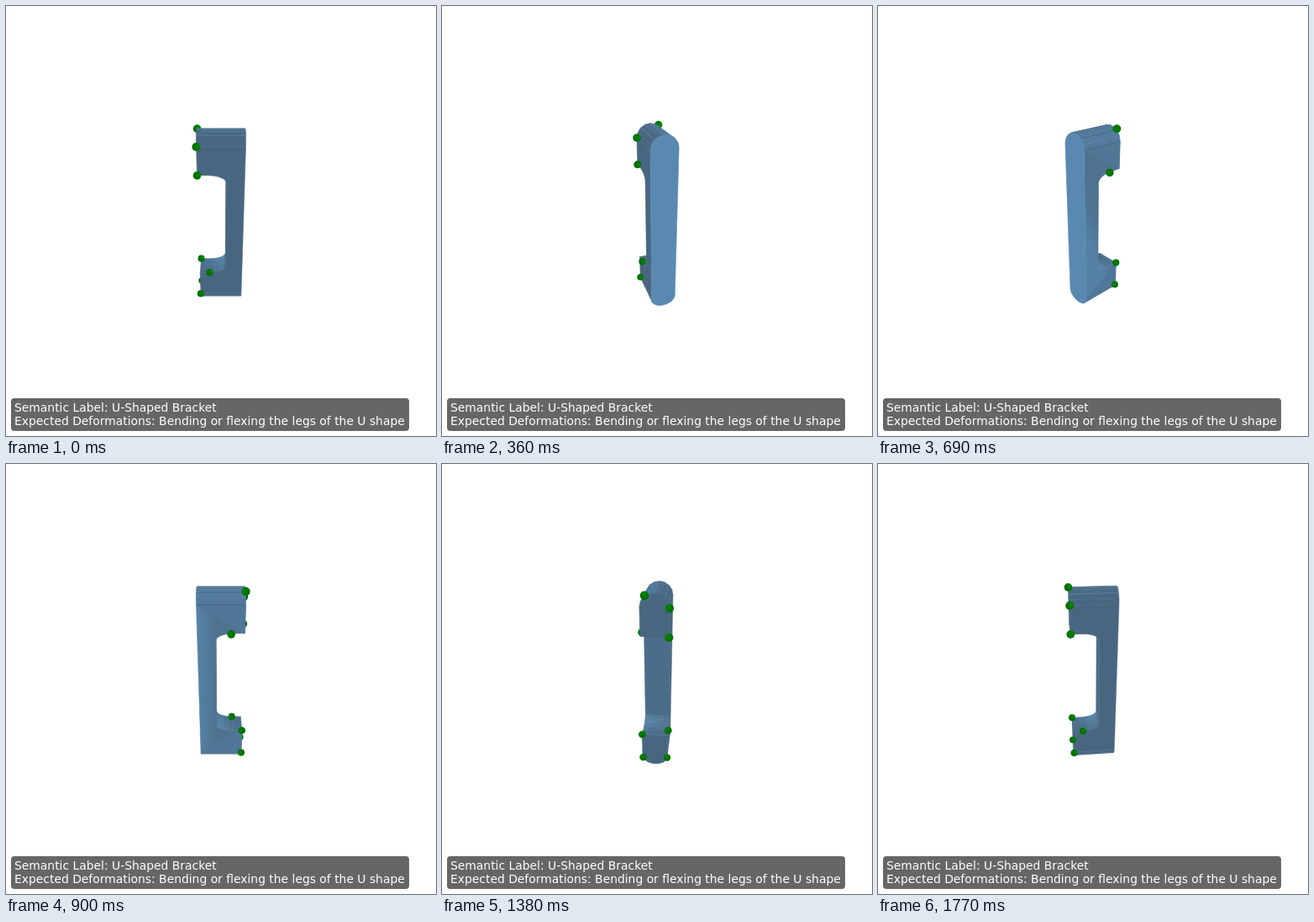
These frames come from a looping animation (512 by 512 pixels, 1.8 s). An HTML page with a canvas:

```html
<!DOCTYPE html>
<html lang="en">
<head>
<meta charset="utf-8">
<title>U-Shaped Bracket</title>
<style>
  html, body { margin: 0; width: 100%; height: 100%; overflow: hidden; background: #fff; }
  canvas, svg { position: absolute; left: 0; top: 0; }
  text { font: 13.89px "DejaVu Sans", sans-serif; fill: #fff; }
</style>
</head>
<body>
<canvas id="view" width="512" height="512"></canvas>
<svg width="512" height="512">
  <rect x="6" y="467" width="474" height="39" rx="4" fill="#666"/>
  <text x="10" y="483">Semantic Label: U-Shaped Bracket</text>
  <text x="10" y="499">Expected Deformations: Bending or flexing the legs of the U shape</text>
</svg>
<script>
const ctx = document.getElementById('view').getContext('2d');
const DIST = 448, SIN_E = 0.467, COS_E = 0.884;   // camera distance and elevation
const LIGHT = [0.8, 0.3, -0.5];

// Bracket: x = leg direction (spine at +x), y = up, z = thickness
const D = 25.7, W = 15.4, TOP = 95, BOTTOM = -95.5, LEG = 63.5;
const SPINE = 5.7, FILLET_X = -14, FILLET_Y = 55, STEPS = 8;

let cos, sin, camera;

function view([x, y, z]) {
  const Z = x * sin + z * cos;
  return [x * cos - z * sin, y * COS_E - Z * SIN_E, y * SIN_E + Z * COS_E];
}

function project(p) {
  const [x, y, z] = view(p), m = 1 / (1 - z / DIST);
  return [256 + x * m, 256 - y * m, m];
}

const facing = (n, p) => n.reduce((sum, v, i) => sum + v * (camera[i] - p[i]), 0) > 0;

function shade(k) {
  const mix = (a, b) => Math.round(a + (b - a) * k);
  return `rgb(${mix(72, 90)},${mix(101, 140)},${mix(126, 181)})`;
}

// ramp = [from point, to point, end tone] blends the tone across the face
function face(normal, points, tone, ramp) {
  if (!facing(normal, points[0])) return;
  let paint = shade(tone);
  if (ramp) {
    const [a, b] = [project(ramp[0]), project(ramp[1])];
    paint = ctx.createLinearGradient(a[0], a[1], b[0], b[1]);
    paint.addColorStop(0, shade(tone));
    paint.addColorStop(1, shade(ramp[2]));
  }
  ctx.beginPath();
  for (const p of points) ctx.lineTo(...project(p).slice(0, 2));
  ctx.closePath();
  ctx.fillStyle = ctx.strokeStyle = paint;
  ctx.lineWidth = 0.5;
  ctx.fill();
  ctx.stroke();
}

function line(a, b, tone) {
  ctx.beginPath();
  for (const p of [a, b]) ctx.lineTo(...project(p).slice(0, 2));
  ctx.strokeStyle = shade(tone);
  ctx.lineWidth = 1;
  ctx.stroke();
}

// Rounded end: side 1 is the top, -1 the bottom; angle runs from +z to -z
function cap(side, x, angle) {
  const [base, r] = side > 0 ? [TOP, 15] : [BOTTOM, 12];
  return [x, base + side * r * Math.sin(angle), W * Math.cos(angle)];
}

const arc = (n, f) => Array.from({ length: n + 1 }, (_, i) => f(i / n));
const capArc = (side, x) => arc(16, u => cap(side, x, u * Math.PI));

function fillet(side, z, u) {
  const t = u * Math.PI / 2;
  return [FILLET_X + (SPINE - FILLET_X) * Math.cos(t), side * (FILLET_Y + (LEG - FILLET_Y) * Math.sin(t)), z];
}

function drawInside() {
  face([-1, 0, 0], [[SPINE, FILLET_Y, W], [SPINE, FILLET_Y, -W], [SPINE, -FILLET_Y, -W], [SPINE, -FILLET_Y, W]], 0.2);
  for (const side of [1, -1]) {
    for (let i = 0; i < STEPS; i++) {
      const u = i / STEPS, v = (i + 1) / STEPS, t = (u + v) * Math.PI / 4;
      const a = fillet(side, -W, u), b = fillet(side, W, u);
      const normal = [-Math.cos(t) / (SPINE - FILLET_X), -side * Math.sin(t) / (LEG - FILLET_Y), 0];
      face(normal, [a, b, fillet(side, W, v), fillet(side, -W, v)],
        0.3 + 0.5 * Math.sin(2 * t), [a, b, 0.15 + 0.2 * Math.sin(2 * t)]);
    }
  }
  const a = [FILLET_X, -LEG, -W], b = [FILLET_X, -LEG, W];
  face([0, 1, 0], [a, b, [-D, -LEG, W], [-D, -LEG, -W]], 0.4, [a, b, 0.15]);
}

function sideOutline(z) {
  return [[D, TOP, z], [-D, TOP, z], [-D, LEG, z],
    ...arc(STEPS, u => fillet(1, z, 1 - u)), ...arc(STEPS, u => fillet(-1, z, u)),
    [-D, -LEG, z], [-D, BOTTOM, z], [D, BOTTOM, z]];
}

function drawOutside() {
  face([0, 0, 1], sideOutline(W), 0.03);
  face([0, 0, -1], sideOutline(-W), 0.72, [[D, 0, -W], [SPINE, 0, -W], 0.33]);
  for (const y of [1, -1]) {
    const outer = y > 0 ? TOP : BOTTOM;
    face([0, 0, -1], [[D, outer, -W], [-D, outer, -W], [-D, y * LEG, -W]], 0.46);
  }
  for (const side of [1, -1]) {
    for (let i = 0; i < STEPS; i++) {
      const a = i / STEPS * Math.PI, b = (i + 1) / STEPS * Math.PI, mid = (a + b) / 2;
      const normal = [0, side * Math.sin(mid), Math.cos(mid)];
      const tone = Math.max(0.05, 0.1 + 0.3 * side * Math.sin(mid) - 0.4 * Math.cos(mid));
      face(normal, [cap(side, -D, a), cap(side, D, a), cap(side, D, b), cap(side, -D, b)], tone);
    }
  }
  for (const [angle, tone] of [[0.8, 0.6], [1.25, 0.05], [2.3, 0.1], [Math.PI, 0]]) {
    const a = cap(1, -D, angle), b = cap(1, D, angle);
    if (facing([0, Math.sin(angle), Math.cos(angle)], a)) line(a, b, tone);
  }
  face([1, 0, 0], [...capArc(1, D), ...capArc(-1, D).reverse()], 0.93);
  face([-1, 0, 0], [...capArc(1, -D), [-D, LEG, -W], [-D, LEG, W]], 0.03);
  face([-1, 0, 0], [...capArc(-1, -D), [-D, -LEG, -W], [-D, -LEG, W]], 0.03);
}

const END = [-1, 0, 0], FRONT = [0, 0, 1], BACK = [0, 0, -1], UP = [0, 1, 0];
const balls = [
  { at: [-D, 107.5, -10], on: [END, [0, 0.76, -0.65]] },
  { at: [-D, TOP, W], on: [END, FRONT] },
  { at: [-D, LEG, W], on: [END, FRONT] },
  { at: [-11, 62.5, -W], on: [BACK] },
  { at: [FILLET_X, -LEG, W], on: [FRONT], inside: true },
  { at: [-D, -LEG, -W], on: [END, BACK], inside: true },
  { at: [-D, -98.5, -14.8], on: [END, BACK] },
  { at: [-D, -96.5, W], on: [END, FRONT] }
];

// 0 = behind the bracket, 1 = between inner and outer faces, 2 = in front
function layer({ at, on, inside }) {
  if (on.some(n => facing(n, at))) return 2;
  return inside && facing(UP, at) ? 1 : 0;
}

function drawBalls(level) {
  const [lx, ly] = view(LIGHT);
  for (const ball of balls) {
    if (layer(ball) !== level) continue;
    const [x, y, m] = project(ball.at), r = 4.4 * m;
    const glow = ctx.createRadialGradient(x + lx * r * 0.7, y - ly * r * 0.7, 0, x, y, r * 1.5);
    glow.addColorStop(0, '#008a00');
    glow.addColorStop(1, '#005c00');
    ctx.fillStyle = glow;
    ctx.beginPath();
    ctx.arc(x, y, r, 0, 2 * Math.PI);
    ctx.fill();
  }
}

function draw(time) {
  const turn = Math.floor(time % 1800 / 30) * Math.PI / 30;
  cos = Math.cos(turn);
  sin = Math.sin(turn);
  camera = [DIST * COS_E * sin, DIST * SIN_E, DIST * COS_E * cos];
  ctx.clearRect(0, 0, 512, 512);
  drawBalls(0);
  drawInside();
  drawBalls(1);
  drawOutside();
  drawBalls(2);
}

const start = performance.now();
function tick() {
  draw(performance.now() - start);
  requestAnimationFrame(tick);
}
tick();
</script>
</body>
</html>
```
